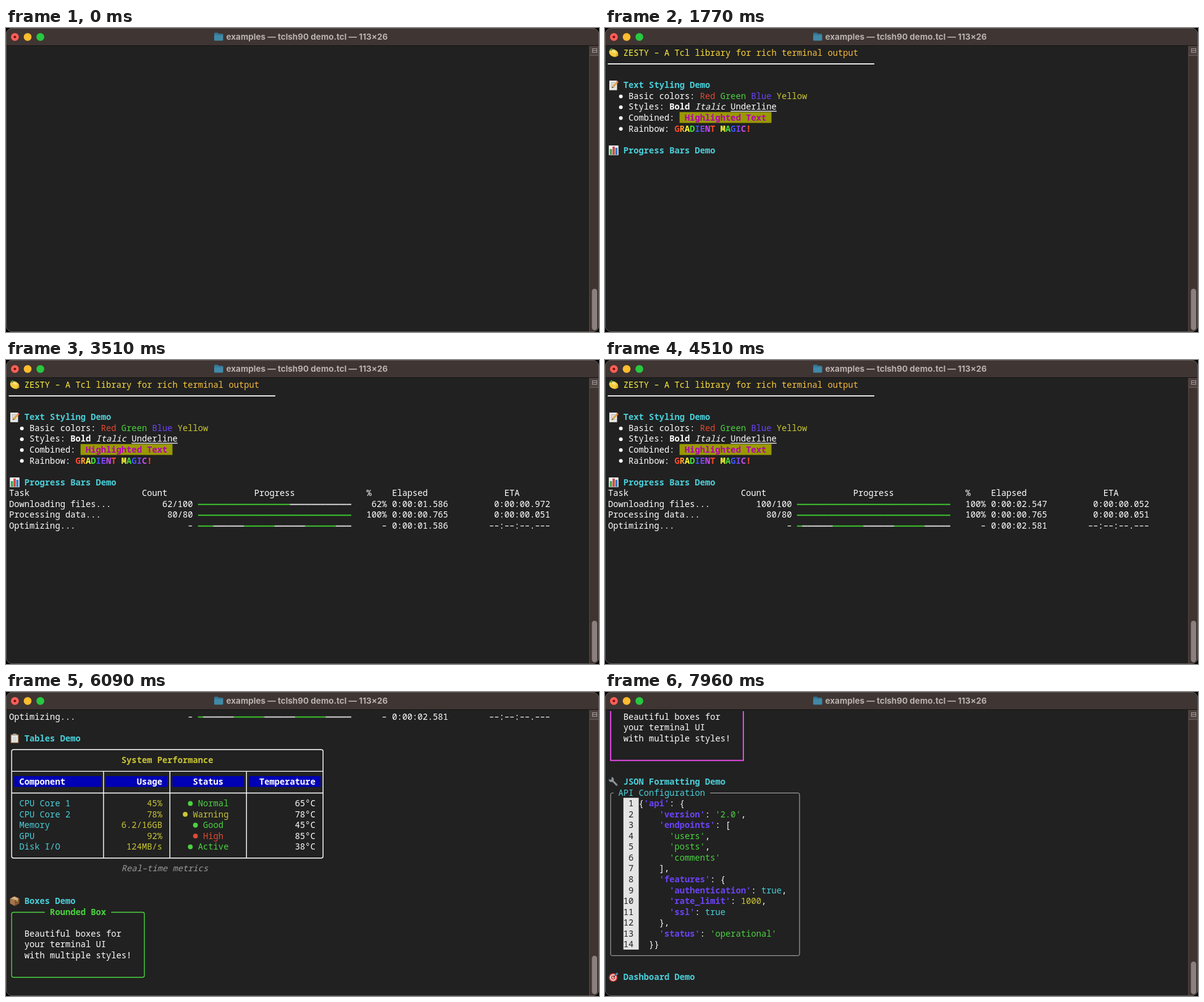
Animation of 960 by 492 pixels, one loop 7.99 s. Source, as an HTML page with a canvas:

```html
<!DOCTYPE html>
<html lang="en">
<head>
<meta charset="utf-8">
<title>Terminal demo</title>
<style>
  html, body { margin: 0; width: 100%; height: 100%; overflow: hidden; background: #000; }
  canvas { display: block; width: 960px; height: 492px; }
</style>
</head>
<body>
<canvas id="stage"></canvas>
<script>
const W = 960, H = 492, LOOP = 7990;
const CW = 8.265, RH = 17.55, LEFT = 5, TOP = 31.2, ROWS = 26;
const MONO = '"Noto Sans Mono", "DejaVu Sans Mono", monospace';
const WHITE = '#fff', CYAN = '#4acfd9', GREEN = '#4bd23f', RED = '#dd4a31',
  YELLOW = '#c9c534', BLUE = '#6b43f5', MAGENTA = '#e148e4', GREY = '#9a9a9a';

const canvas = document.getElementById('stage');
const dpr = window.devicePixelRatio || 1;
canvas.width = W * dpr;
canvas.height = H * dpr;
const g = canvas.getContext('2d');
g.scale(dpr, dpr);
g.font = '100px ' + MONO;
const SIZE = CW / g.measureText('0').width * 100;

const colX = c => LEFT + c * CW;
const midX = c => colX(c + 0.5);
const rowY = r => TOP + r * RH;
const midY = r => rowY(r + 0.5);
const ruleY = r => midY(r) + 0.6;

function rect(x, y, w, h, color) {
  g.fillStyle = color;
  g.fillRect(x, y, w, h);
}
function disc(x, y, r, color) {
  g.fillStyle = color;
  g.beginPath();
  g.arc(x, y, r, 0, 7);
  g.fill();
}
function poly(color, ...pts) {
  g.fillStyle = color;
  g.beginPath();
  for (let i = 0; i < pts.length; i += 2) g.lineTo(pts[i], pts[i + 1]);
  g.fill();
}
function line(x1, y1, x2, y2, color, width = 1.4) {
  g.strokeStyle = color;
  g.lineWidth = width;
  g.beginPath();
  g.moveTo(x1, y1);
  g.lineTo(x2, y2);
  g.stroke();
}
function round(x, y, w, h, r) {
  g.beginPath();
  g.roundRect(x, y, w, h, r);
}
const fillCells = (row, col, cols, rows, color) =>
  rect(colX(col), rowY(row) - 0.4, cols * CW, rows * RH, color);

// One glyph per cell; color may be a function of the index
function put(row, col, text, color = WHITE, style = '500') {
  g.font = `${style} ${SIZE}px ${MONO}`;
  [...text].forEach((ch, i) => {
    const fill = typeof color === 'function' ? color(i) : color;
    if (ch === '●') return disc(midX(col + i), midY(row), 3.9, fill);
    if (ch === '•') return disc(midX(col + i), midY(row) + 0.5, 3, fill);
    g.fillStyle = fill;
    // terminal hyphens are wide
    g.fillText(ch === '-' ? '–' : ch, colX(col + i), rowY(row) + 13.5);
  });
  return col + text.length;
}
const putRight = (row, end, text, color, style) =>
  put(row, end - text.length, text, color, style);

// Consecutive [text, color, style] runs
function runs(row, col, ...parts) {
  for (const p of parts) col = put(row, col, ...p);
}

function frame(row, cols, rows, color, width, radius, gapFrom, gapTo, inset = 0) {
  const x1 = midX(0) + inset, x2 = midX(cols - 1) - inset;
  const y1 = ruleY(row) + inset, y2 = ruleY(row + rows - 1) - inset;
  g.strokeStyle = color;
  g.lineWidth = width;
  g.beginPath();
  g.moveTo(gapTo, y1);
  g.arcTo(x2, y1, x2, y2, radius);
  g.arcTo(x2, y2, x1, y2, radius);
  g.arcTo(x1, y2, x1, y1, radius);
  g.arcTo(x1, y1, gapFrom, y1, radius);
  g.lineTo(gapFrom, y1);
  g.stroke();
}

// Icons, each in a 16 by 16 box
const icons = {
  lemon() {
    g.save();
    g.translate(8, 8.5);
    g.rotate(0.5);
    g.fillStyle = '#f5cc3d';
    g.beginPath();
    g.ellipse(0, 0, 7.8, 5.8, 0, 0, 7);
    g.fill();
    poly('#e0a92c', 5, -3, 9, 0, 5, 3);
    g.fillStyle = '#fbe58a';
    g.beginPath();
    g.ellipse(-1, -2.2, 3.5, 1.6, 0, 0, 7);
    g.fill();
    g.restore();
    poly('#5d9b3a', 1, 3, 5, 0.5, 7, 3, 4, 5);
  },
  memo() {
    rect(1, 0.5, 12.5, 15.5, '#eceae6');
    for (let y = 4; y < 14; y += 2.5) line(3, y, 11, y, '#a3a3a3', 0.8);
    line(6.5, 11, 14, 3, '#e8a33b', 2.8);
    line(13.2, 3.8, 15, 1.9, '#dc6f75', 2.8);
    poly('#5a4632', 5, 12.6, 5.8, 10, 7.6, 11.8);
  },
  chart() {
    rect(0.2, 0.2, 15.6, 15.6, '#edf0f2');
    rect(1.8, 6, 3.6, 9.2, '#3aa655');
    rect(6.2, 2, 3.6, 13.2, '#d8433b');
    rect(10.6, 4, 3.6, 11.2, '#2f78c8');
  },
  clipboard() {
    rect(1.5, 1.5, 13, 14, '#a5714a');
    rect(2.8, 3, 10.4, 11.5, '#f0efec');
    for (let y = 6; y < 14; y += 2.2) line(4.5, y, 11.5, y, '#b5b5b5', 0.8);
    rect(5, 0.3, 6, 3, '#9c9fa3');
  },
  parcel() {
    poly('#c89a68', 8, 0.5, 15.5, 4, 8, 7.5, 0.5, 4);
    poly('#a5764a', 0.5, 4, 8, 7.5, 8, 15.8, 0.5, 12);
    poly('#85592f', 15.5, 4, 8, 7.5, 8, 15.8, 15.5, 12);
    poly('#e0c49c', 4, 2.3, 5.8, 1.5, 13, 5, 13, 8, 11.4, 8.8, 11.4, 5.8);
  },
  wrench() {
    line(4.5, 4.5, 14, 14.2, '#8d9499', 3);
    disc(4.3, 4.5, 4, '#8d9499');
    disc(2.6, 2.4, 2.3, '#212121');
    disc(13.6, 13.8, 1, '#44484b');
  },
  target() {
    [['#d23b34', 7], ['#f1eeec', 5.2], ['#d23b34', 3.5], ['#f1eeec', 1.8]]
      .forEach(([c, r]) => disc(7.2, 8.8, r, c));
    line(7.2, 8.8, 12.5, 3.5, '#3d4a55', 1.4);
    poly('#4794c9', 11, 3.2, 13.5, 0.4, 13.8, 2.2, 15.8, 2.6, 13, 5.2);
  }
};
function icon(name, row) {
  g.save();
  g.translate(6, midY(row) - 8);
  icons[name]();
  g.restore();
}
const heading = (name, text) => row => {
  icon(name, row + 1);
  put(row + 1, 3, text, CYAN, 'bold');
};

function intro(row) {
  icon('lemon', row);
  put(row, 3, 'ZESTY - A Tcl library for rich terminal output',
    i => `rgb(${254 - i * 0.15},${245 - i * 1.4},60)`);
  line(4.5, ruleY(row + 1), 436, ruleY(row + 1), WHITE, 1.6);
}
const basics = row => runs(row, 2, ['• Basic colors: '], ['Red ', RED],
  ['Green ', GREEN], ['Blue ', BLUE], ['Yellow', YELLOW]);
function styles(row) {
  runs(row, 2, ['• Styles: '], ['Bold ', WHITE, 'bold'],
    ['Italic ', WHITE, 'italic'], ['Underline']);
  line(colX(24), rowY(row) + 15.6, colX(33), rowY(row) + 15.6, WHITE, 1.2);
}
function combined(row) {
  put(row, 2, '• Combined:');
  fillCells(row, 14, 18, 1, '#999900');
  put(row, 15, 'Highlighted Text', '#b400b4', 'bold');
}
const RAINBOW = ['#ff4a2c', '#ff9a2a', '#ffff35', '#45e038', '#3f55ff', '#7a45f5', '#c74cf0'];
const rainbow = row => runs(row, 2, ['• Rainbow: '],
  ['GRADIENT MAGIC!', i => RAINBOW[i % 7], 'bold']);

// Progress bars: 50 ticks, with the clock read at a few of them
const CLOCK = [[0, 0], [11, 564], [15, 765], [31, 1586], [49, 2547], [50, 2581]];
function elapsed(tick) {
  const i = Math.max(1, CLOCK.findIndex(p => p[0] >= tick));
  const [a, x] = CLOCK[i - 1], [b, y] = CLOCK[i];
  return x + (y - x) * (tick - a) / (b - a);
}
const clock = ms =>
  `0:00:0${Math.floor(ms / 1000)}.${String(Math.round(ms % 1000)).padStart(3, '0')}`;
const NO_TIME = '--:--:--.---';

function bar(row, isOn) {
  const y = ruleY(row);
  for (let c = 0; c < 30; c++)
    line(colX(37 + c), y, colX(38 + c) + 0.2, y, isOn(c) ? '#3cc42e' : '#d2d2d2', 2);
}
function task(row, name, count, percent, time, eta, isOn) {
  put(row, 0, name);
  putRight(row, 36, count);
  bar(row, isOn);
  putRight(row, 74, percent);
  put(row, 75, time);
  putRight(row, 106, eta);
}
function counted(row, name, tick, step, total) {
  const n = Math.min(tick * step, total);
  const last = Math.min(tick, total / step - 1), ms = elapsed(last);
  const eta = last ? clock(ms * (total - last * step) / (last * step)) : NO_TIME;
  task(row, name, `${n}/${total}`, Math.round(n / total * 100) + '%', clock(ms), eta,
    c => c < Math.floor(n / total * 30));
}
function progress(row, t) {
  const tick = Math.min(50, Math.floor((t - 1940) / 50.5));
  [[0, 'Task'], [26, 'Count'], [48, 'Progress'], [70, '%'], [75, 'Elapsed'], [97, 'ETA']]
    .forEach(([col, text]) => put(row, col, text));
  counted(row + 1, 'Downloading files...', tick, 2, 100);
  counted(row + 2, 'Processing data...', tick, 5, 80);
  const ms = elapsed(tick), shift = Math.floor(ms / 46.9);
  task(row + 3, 'Optimizing...', '-', '-', clock(ms), NO_TIME,
    c => (c - shift + 1200) % 12 < 6);
}

function table(row) {
  const edges = [0, 18, 31, 46, 61];
  frame(row, 62, 11, WHITE, 1.4, 3, 100, 100);
  for (const r of [2, 4]) line(midX(0), ruleY(row + r), midX(61), ruleY(row + r), WHITE);
  for (const c of edges.slice(1, 4)) line(midX(c), ruleY(row + 2), midX(c), ruleY(row + 10), WHITE);
  put(row + 1, 22, 'System Performance', YELLOW, 'bold');
  for (let i = 0; i < 4; i++)
    fillCells(row + 3, edges[i] + 1, edges[i + 1] - edges[i] - 1, 1, '#0000b4');
  [[2, 'Component'], [25, 'Usage'], [36, 'Status'], [49, 'Temperature']]
    .forEach(([col, text]) => put(row + 3, col, text, WHITE, 'bold'));
  [['CPU Core 1', '45%', 'Normal', GREEN, 65],
   ['CPU Core 2', '78%', 'Warning', YELLOW, 78],
   ['Memory', '6.2/16GB', 'Good', GREEN, 45],
   ['GPU', '92%', 'High', RED, 85],
   ['Disk I/O', '124MB/s', 'Active', GREEN, 38]
  ].forEach(([name, usage, status, color, temp], i) => {
    const r = row + 5 + i;
    put(r, 2, name, CYAN);
    putRight(r, 30, usage, YELLOW);
    put(r, 38 - Math.ceil(status.length / 2), '● ' + status, color);
    putRight(r, 60, temp + '°C');
  });
  put(row + 11, 22, 'Real-time metrics', GREY, 'italic');
}

function box(row, title, color, width, radius, double) {
  const col = 2 + Math.floor((23 - title.length) / 2);
  const from = colX(col - 1), to = colX(col + title.length + 1);
  for (const inset of double ? [-1.5, 1.5] : [0])
    frame(row, 27, 7, color, width, radius, from, to, inset);
  put(row, col, title, color, 'bold');
  ['Beautiful boxes for', 'your terminal UI', 'with multiple styles!']
    .forEach((text, i) => put(row + 2 + i, 3, text));
}

const CODE = `{'api': {
    'version': '2.0',
    'endpoints': [
      'users',
      'posts',
      'comments'
    ],
    'features': {
      'authentication': true,
      'rate_limit': 1000,
      'ssl': true
    },
    'status': 'operational'
  }}`.split('\n');
function token(text, rest) {
  if (text[0] === "'") return rest[0] === ':' ? [text, BLUE, 'bold'] : [text, GREEN];
  if (text === 'true') return [text, CYAN];
  return /\d/.test(text) ? [text, YELLOW] : [text, WHITE];
}
function panel(row) {
  frame(row, 38, 16, '#b4b4b4', 1, 2.5, colX(1) + 0.5, colX(20));
  put(row, 2, 'API Configuration', CYAN);
  fillCells(row + 1, 3, 3, 14, '#e4e4e4');
  CODE.forEach((src, i) => {
    const r = row + 1 + i;
    putRight(r, 5, String(i + 1), '#222');
    for (const m of src.matchAll(/'[^']*'|\w+|[^\w\s]/g))
      put(r, 6 + m.index, ...token(m[0], src.slice(m.index + m[0].length)));
  });
}

// [time, lines printed, draw]
const blocks = [
  [70, 2, intro],
  [640, 2, heading('memo', 'Text Styling Demo')],
  [940, 1, basics],
  [1080, 1, styles],
  [1240, 1, combined],
  [1390, 1, rainbow],
  [1710, 2, heading('chart', 'Progress Bars Demo')],
  [1940, 4, progress],
  [5050, 2, heading('clipboard', 'Tables Demo')],
  [5580, 13, table],
  [6020, 2, heading('parcel', 'Boxes Demo')],
  [6020, 7, row => box(row, 'Rounded Box', GREEN, 1.4, 3)],
  [6350, 7, row => box(row, 'Double Box', YELLOW, 1.2, 0, true)],
  [6680, 7, row => box(row, 'Heavy Box', MAGENTA, 2, 0)],
  [7020, 2, heading('wrench', 'JSON Formatting Demo')],
  [7560, 16, panel],
  [7890, 2, heading('target', 'Dashboard Demo')]
];

function chrome(scroll) {
  rect(0, 0, W, 28, '#3f3532');
  rect(0, 28, W, 1, '#151414');
  rect(944, 29, 16, H - 29, '#403431');
  rect(944, 29, 1, H - 29, '#524744');
  rect(945, 29, 15, 15, '#4d423f');
  rect(945, 44, 15, 1, '#6a605d');
  g.strokeStyle = '#a39a97';
  g.lineWidth = 1;
  g.strokeRect(949.5, 33.5, 7, 6);
  line(949, 36.5, 957, 36.5, '#a39a97', 1);

  const thumb = 445 * ROWS / (172.6 + scroll);
  g.fillStyle = '#8b807d';
  round(948.5, 489 - thumb, 8.5, thumb, 4.2);
  g.fill();

  disc(14.4, 14.5, 6.3, '#ff5f57');
  disc(14.4, 14.5, 2.1, '#7c0d08');
  disc(35, 14.5, 6.3, '#febc2e');
  disc(55.6, 14.5, 6.3, '#28c840');

  g.fillStyle = '#2f6f8c';
  round(337, 7.5, 7, 5, 1.5);
  g.fill();
  g.fillStyle = '#4089a8';
  round(337, 9.5, 14.5, 11, 1.5);
  g.fill();
  rect(337, 10.5, 14.5, 1, '#2f6f8c');

  g.font = '700 13.5px Inter, "Open Sans", sans-serif';
  g.fillStyle = '#b9b2af';
  g.fillText('examples — tclsh90 demo.tcl — 113×26', 356.5, 18.6);
}

function draw(t) {
  rect(0, 0, W, H, '#000');
  g.save();
  round(0, 0, W, H, 10);
  g.clip();
  rect(0, 0, W, H, '#212121');

  const shown = blocks.filter(b => t >= b[0]);
  const scroll = Math.max(0, shown.reduce((sum, b) => sum + b[1], 0) - ROWS + 1);
  g.save();
  g.beginPath();
  g.rect(0, 31, 944, H);
  g.clip();
  // start below the row's descenders when lines have left the top
  let row = -scroll;
  for (const [, lines, paint] of shown) {
    if (row + lines > 0) paint(row, t);
    row += lines;
  }
  g.restore();
  if (scroll) rect(0, 29, 944, 2, '#212121');

  chrome(scroll);
  g.restore();
  g.strokeStyle = '#5f5a59';
  g.lineWidth = 1;
  round(0.5, 0.5, W - 1, H - 1, 9.5);
  g.stroke();
}

const start = performance.now();
function tick() {
  draw((performance.now() - start) % LOOP);
  requestAnimationFrame(tick);
}
tick();
</script>
</body>
</html>
```
